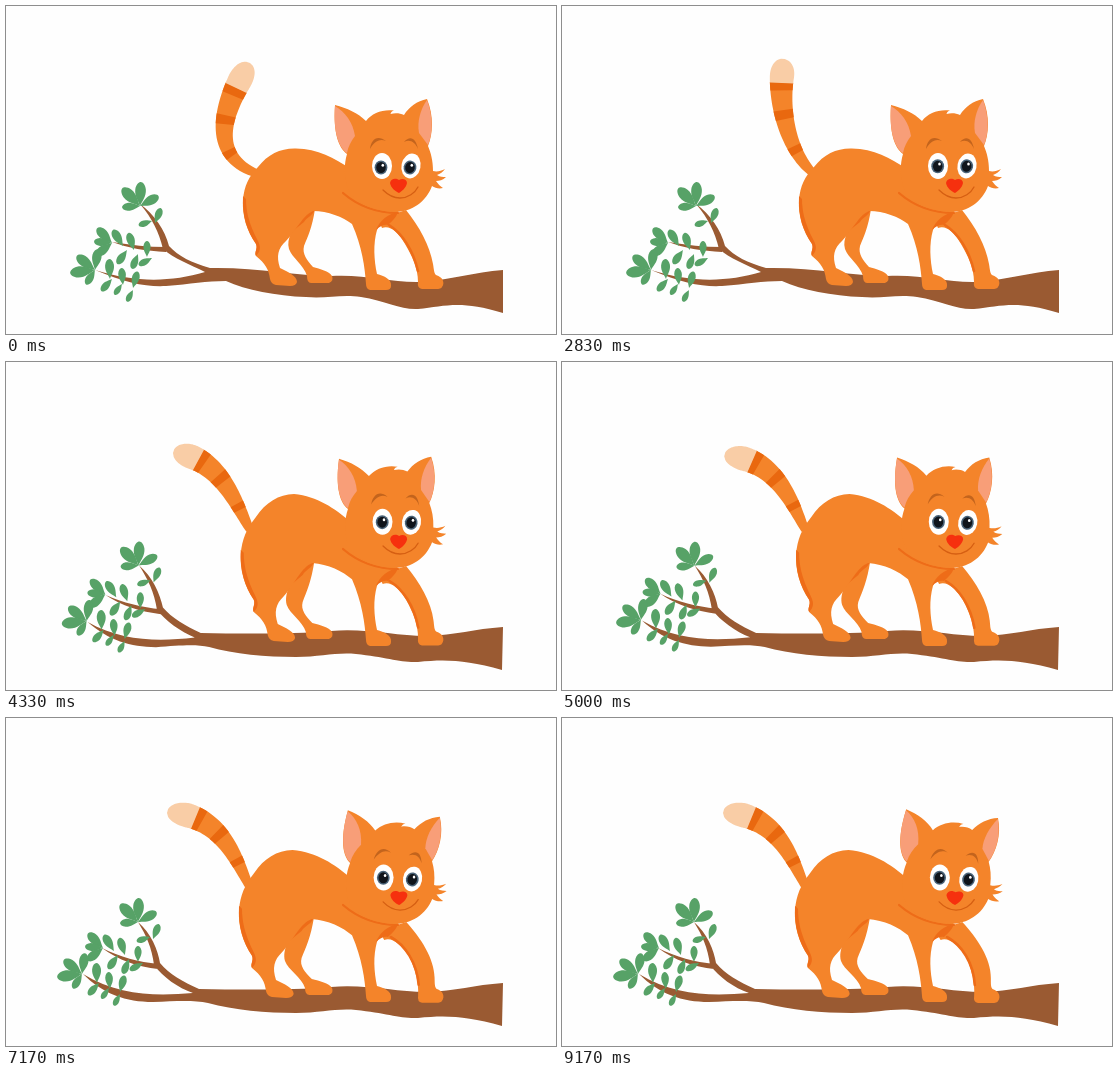
Recreate the animation shown at these times as an HTML page with a canvas. Size 550 px wide and 328 px high, loop 9.33 s.

```html
<!DOCTYPE html>
<html>
<head>
<meta charset="utf-8">
<style>
html, body { margin: 0; width: 550px; height: 328px; overflow: hidden; background: #fefefe; }
canvas { display: block; }
</style>
</head>
<body>
<canvas id="stage" width="550" height="328"></canvas>
<script>
const ctx = document.getElementById('stage').getContext('2d');
const LOOP = 9330, STEP = 1000 / 6, CUT = 3000;
const ORANGE = '#f4842a', DARK = '#ee6c18', STRIPE = '#e9680f', PALE = '#f9cda6', EAR = '#f89e78',
  BROWN = '#9a5a32', GREEN = '#57a267', LINE = '#d65f12';

const clamp = v => Math.max(0, Math.min(1, v));
const lerp = (a, b, k) => a + (b - a) * k;
const ramp = (t, from, to) => clamp((t - from) / (to - from));
const mix = (a, b, k) => a.map((v, i) => lerp(v, b[i], k));
const bump = (v, mid, width) => Math.exp(-(((v - mid) / width) ** 2));

function fill(color, d) {
  ctx.fillStyle = color;
  ctx.fill(new Path2D(d));
}
function stroke(color, width, d) {
  ctx.strokeStyle = color;
  ctx.lineWidth = width;
  ctx.lineCap = 'round';
  ctx.stroke(new Path2D(d));
}
function oval(color, x, y, rx, ry, turn = 0) {
  ctx.fillStyle = color;
  ctx.beginPath();
  ctx.ellipse(x, y, rx, ry, turn, 0, 7);
  ctx.fill();
}
// Moves every "x,y" pair of a path through fn.
const warp = (d, fn) => d.replace(/([\d.]+),([\d.]+)/g,
  (_, x, y) => fn(+x, +y).map(v => v.toFixed(2)).join());
// Blends two paths of the same structure.
function blend(a, b, k) {
  const nums = b.match(/[\d.]+/g);
  let i = 0;
  return a.replace(/[\d.]+/g, v => lerp(+v, +nums[i++], k).toFixed(2));
}

// Main bough with lower and upper twig, then the side twig.
const boughs = [
  'M497,264 C468,266 445,274 415,276 C385,277 360,268 325,270 C290,270 250,261 204,262 C186,257 172,250 163,240 C159,224 148,208 134,198 C146,212 153,226 157,243 C167,252 185,259 199,266 C165,276 130,277 89,264 C120,277 140,281 160,280 C185,278 200,275 220,275 C240,284 270,290 300,291 C320,293 335,288 355,291 C380,295 395,304 412,303 C440,300 455,294 497,307Z M160,241 C142,241 125,239 106,236 C122,242 140,245 160,246Z',
  'M497,265 C468,267 450,273 420,274 C390,274 360,266 325,269 C290,272 240,272 196,271 C181,264 168,256 159,246 C156,232 147,214 134,203 C143,217 150,230 153,248 C162,260 176,269 190,276 C155,281 120,281 85,263 C106,280 128,286 152,286 C175,284 190,282 204,285 C228,292 260,295 290,295 C315,295 330,290 350,292 C380,295 395,301 412,300 C440,297 460,298 496,308Z M157,248 C138,246 119,242 102,235 C118,245 137,250 157,253Z',
  'M497,265 C468,267 450,273 420,274 C390,274 360,266 325,269 C290,272 240,272 193,271 C177,264 163,256 154,245 C152,232 145,215 132,204 C140,217 146,230 148,247 C157,259 172,270 187,275 C150,278 113,278 77,256 C97,276 120,284 147,284 C171,283 188,282 202,285 C228,292 260,295 290,295 C315,295 330,290 350,292 C380,295 395,301 412,300 C440,297 460,298 496,308Z M152,246 C133,244 114,239 96,230 C112,242 132,249 152,251Z'
];

// Hub places at rest, after the cut and at the end; leaves are [dx, dy, degrees, length].
const clusters = [
  { hubs: [[134, 200], [133, 203], [132, 204]],
    leaves: [[0, 0, 225, 25], [0, 0, 272, 24], [0, 0, 332, 21], [0, 0, 176, 18],
      [15, 17, 292, 16], [12, 15, 162, 14]] },
  { hubs: [[106, 237], [101, 234], [97, 230]],
    leaves: [[0, 0, 225, 21], [0, 0, 185, 18], [0, 0, 142, 20],
      [11, 3, 238, 19], [22, 7, 252, 18], [35, 14, 270, 16],
      [15, 7, 125, 17], [26, 11, 112, 16], [40, 15, 152, 15]] },
  { hubs: [[89, 264], [84, 261], [76, 256]],
    leaves: [[0, 0, 218, 23], [0, 0, 278, 21], [0, 0, 173, 25], [0, 0, 122, 17],
      [15, 9, 268, 20], [28, 15, 265, 17], [38, 18, 285, 17],
      [17, 9, 132, 16], [27, 14, 125, 13], [38, 20, 118, 13]] }
];
const LEAF = new Path2D('M0,0C.2,-.07 .4,-.25 .7,-.22C.9,-.19 1,-.08 1,0C1,.08 .9,.19 .7,.22C.4,.25 .2,.07 0,0Z');

function drawBranch(after, k) {
  fill(BROWN, after ? blend(boughs[1], boughs[2], k) : boughs[0]);
  ctx.fillStyle = GREEN;
  for (const { hubs, leaves } of clusters) {
    const [hx, hy] = after ? mix(hubs[1], hubs[2], k) : hubs[0];
    for (const [dx, dy, deg, size] of leaves) {
      ctx.save();
      ctx.translate(hx + dx, hy + dy);
      ctx.rotate(deg * Math.PI / 180);
      ctx.scale(size, size);
      ctx.fill(LEAF);
      ctx.restore();
    }
  }
}

// Tail: time followed by the four control points of its centre line.
const tailKeys = [
  [500, 252, 168, 196, 148, 222, 92, 244, 57],
  [2830, 252, 168, 222, 142, 214, 86, 223, 53],
  [3500, 247, 168, 220, 137, 206, 98, 202, 65],
  [4330, 244, 168, 230, 141, 212, 93, 167, 91],
  [5170, 243, 168, 229, 138, 212, 94, 161, 95]
];
function tailAt(t) {
  let i = 0;
  while (i < tailKeys.length - 2 && t > tailKeys[i + 1][0]) i++;
  const a = tailKeys[i], b = tailKeys[i + 1];
  return mix(a, b, ramp(t, a[0], b[0])).slice(1);
}
function tailPart(p, color, from, to) {
  const left = [], right = [];
  for (let i = 0; i <= 30; i++) {
    const s = lerp(from, to, i / 30), q = 1 - s;
    const [x, y] = [0, 1].map(c => q*q*q*p[c] + 3*q*q*s*p[c+2] + 3*q*s*s*p[c+4] + s*s*s*p[c+6]);
    const [dx, dy] = [0, 1].map(c => q*q*(p[c+2]-p[c]) + 2*q*s*(p[c+4]-p[c+2]) + s*s*(p[c+6]-p[c+4]));
    const cap = Math.sqrt(1 - ramp(s, .83, 1) ** 2);
    const w = (4 + 9.5 * s ** .9) * cap / Math.hypot(dx, dy);
    left.push([x - dy * w, y + dx * w]);
    right.unshift([x + dy * w, y - dx * w]);
  }
  fill(color, 'M' + left.concat(right).join('L') + 'Z');
}
function drawTail(t) {
  const p = tailAt(t);
  tailPart(p, ORANGE, 0, .79);
  tailPart(p, PALE, .78, 1);
  for (const [a, b] of [[.22, .28], [.5, .57], [.725, .785]]) tailPart(p, STRIPE, a, b);
}

const body = 'M252,161 C262,148 275,142 290,142.5 C312,143 328,152 345,163 L392,206 C384,210 376,214 371,224 C367,238 368,254 371,268 C378,270 386,273 385,280 Q385,284 380,284 L364,284 Q360,283 360,278 C359,262 356,240 346,218 C337,211 322,205 307,205 C297,209 292,222 280,235 C272,242 270,250 274,262 C282,266 291,270 291,276 Q290,280 284,280 L270,279 Q265,278 264,273 C263,264 259,257 250,250 C248,246 252,243 250,238 C241,225 236,210 237,194 C238,180 243,170 252,161Z';
const rump = 'M237,190 C236,210 241,225 250,238 C252,243 248,246 250,250 C258,242 252,236 248,227 C243,216 240,205 240,193Z';
const hindLeg = 'M289,212 C288,225 280,232 283,243 C286,252 298,259 301,270 Q301,277 305,277 L323,277 Q328,275 326,270 C323,265 314,263 307,261 C301,254 296,248 298,240 C302,230 306,222 309,203Z';
const hindShade = 'M309,203 C307,210 301,211 298,216 L283,228 C288,216 295,207 309,203Z';
const foreLeg = 'M372,213 L400,204 C413,220 424,240 427,258 C428,264 428,267 430,269 C437,271 439,277 436,281 Q435,283 430,283 L416,283 Q411,282 412,276 C412,262 406,250 399,238 C392,226 384,219 376,222Z';
const foreShade = 'M370,224 C374,214 382,208 392,206 C390,212 386,215 382,219 C378,218 374,220 370,224Z';

function drawBody(t, after, k, lean) {
  const arch = (x, y) => !after ? [x, y] : [
    x - (1 + 3 * k) * clamp((316 - x) / 30),
    y - 10.5 * bump(x, 290, 50) * clamp((240 - y) / 80)
  ];
  const bend = (x, y) => [x + 5 * lean * bump(y, 238, 20), y + 2 * lean * clamp((y - 230) / 30)];
  fill(ORANGE, warp(hindLeg, arch));
  fill(DARK, warp(hindShade, arch));
  fill(ORANGE, warp(foreLeg, bend));
  stroke(DARK, 2.6, warp('M383,219 C396,227 407,244 412,265', bend));
  drawTail(t);
  fill(ORANGE, warp(body, arch));
  fill(DARK, warp(rump, arch));
  fill(DARK, foreShade);
}

const skull = 'M341,148 C333,142 327,128 329,99 C341,102 352,107 360,115 C366,107 377,103 388,104.5 C386,105 385,106 384.5,108 C389,106.5 394,107 398,109 C403,101 411,95 421,93 C428,110 427,128 422,140 C425,147 427,155 427,165 C431,166 435,165 439,163 C437,166 434,168 431,169 C434,171 437,171 440,171 C437,174 433,175 430,175 C432,178 434,180 437,182 C433,183 429,182 426,180 C420,196 406,206 388,206 C366,205 346,196 341,180 C338,169 338,158 341,148Z';
const leftEar = 'M329,100 C327,126 333,142 341,147 C342,141 345,135 349,130 C347,116 339,106 329,100Z';
const rightEar = 'M421,94 C414,104 411,116 413,127 C416,131 419,135 422,139 C427,127 427,110 421,94Z';
const nose = 'M384,177 C385,172 390,172 393,174 C396,172 401,173 401,177 C400,182 396,185 393,187 C389,185 385,182 384,177Z';
const brows = ['M364,143 C365,134 371,128 380,135 C373,132 368,136 364,143Z',
  'M398,136 C404,129 410,132 412,143 C409,136 404,133 398,136Z'];

function drawHead(t, lean) {
  const tilt = (x, y) => {
    const a = .16 * lean * clamp((195 - y) / 90), c = Math.cos(a), s = Math.sin(a);
    return [385 + (x - 385) * c - (y - 190) * s, 190 + (x - 385) * s + (y - 190) * c];
  };
  const part = (color, d) => fill(color, warp(d, tilt));
  stroke(DARK, 2.2, 'M337,187 C352,200 372,207 392,207');
  part(ORANGE, skull);
  part(EAR, leftEar);
  part(EAR, rightEar);
  brows.forEach(d => part('#c3641d', d));

  const look = ramp(t, 500, 2830);
  for (const [x, rx, ry, turn] of [[376, 10, 13, 0], [405, 9.5, 12.5, .2]]) {
    const [ex, ey] = tilt(x, 160);
    oval('#fff', ex, ey, rx, ry, turn);
    const px = ex + lerp(-1, -.3, look), py = ey + lerp(1.5, .3, look);
    oval('#4a6378', px, py, 6.4, 7, turn);
    oval('#10151c', px, py, 4.8, 5.5, turn);
    oval('#fff', px + 1.8, py - 2.3, 1.3, 1.5);
  }
  stroke(LINE, 1.3, warp('M377,184 C382,189 388,192 394,192 C402,192 409,187 412,181', tilt));
  part('#f6300e', nose);
}

function draw(t) {
  const after = t >= CUT, drift = ramp(t, CUT, 6200), lean = ramp(t, CUT, 7900);
  ctx.fillStyle = '#fefefe';
  ctx.fillRect(0, 0, 550, 328);
  drawBranch(after, drift);
  drawBody(t, after, drift, lean);
  drawHead(t, lean);
}

const start = performance.now();
function tick() {
  const t = (performance.now() - start) % LOOP;
  draw(Math.floor((t + 4) / STEP) * STEP + .01);
  requestAnimationFrame(tick);
}
tick();
</script>
</body>
</html>
```
